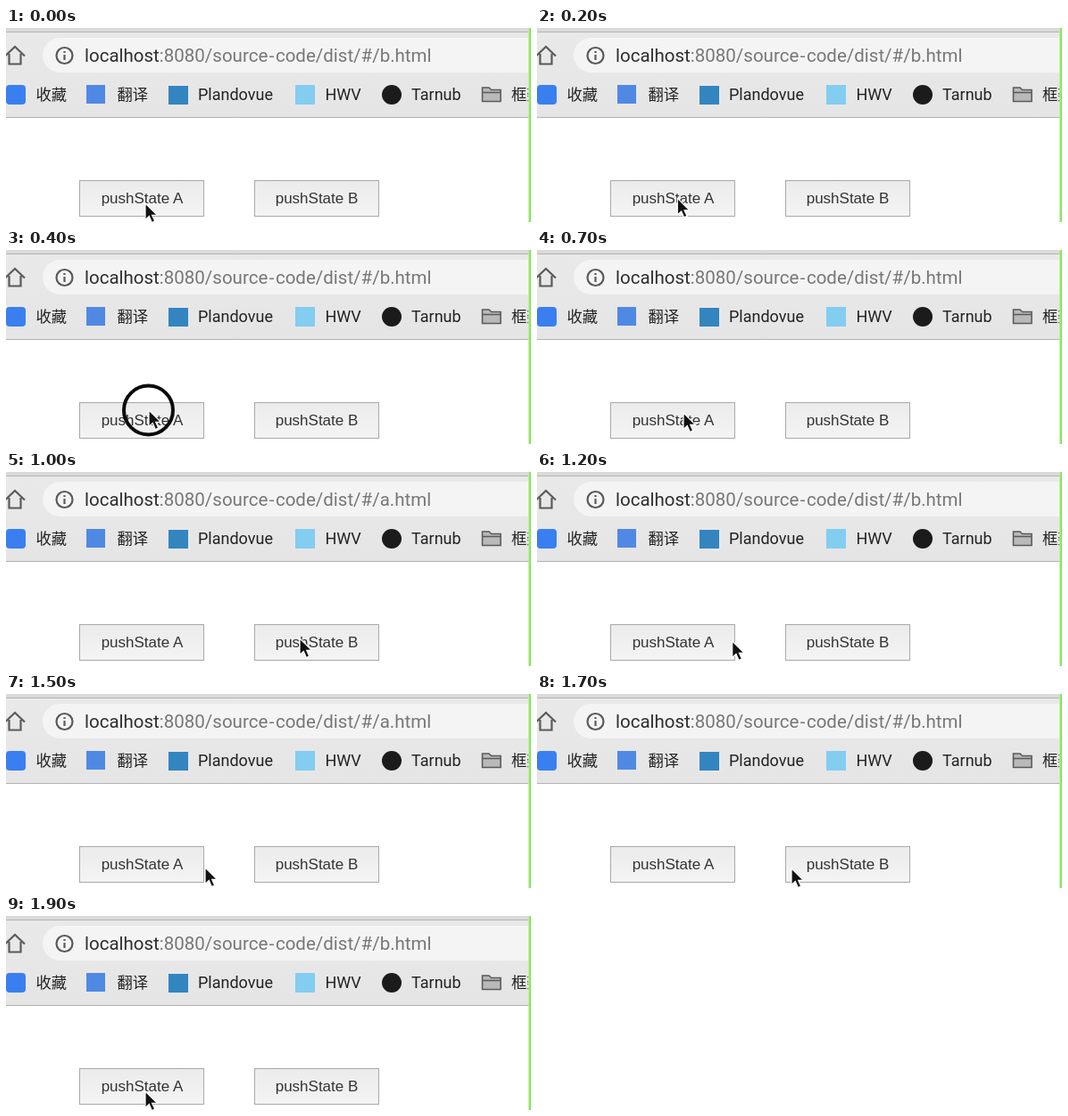
An HTML page that plays this animation: 588x218 px, repeating every 2000 ms.

```html
<!DOCTYPE html>
<html lang="zh">
<head>
<meta charset="utf-8">
<title>pushState</title>
<style>
  html, body { margin: 0; width: 100%; height: 100%; overflow: hidden; background: #fff; }
  svg { display: block; width: 588px; height: 218px; }
  .url { font: 20.5px Roboto, sans-serif; fill: #777; }
  .host { fill: #2e2e2e; }
  .mark { font: 18px Roboto, "Noto Sans CJK SC", "Noto Sans CJK", sans-serif; fill: #222; }
  .cjk { font-size: 17.3px; }
  .btn { font: 17px "Liberation Sans", Arial, sans-serif; fill: #333; text-anchor: middle; }
  .line { fill: none; stroke: #5a5a5a; stroke-width: 2.2; }
</style>
</head>
<body>
<svg viewBox="0 0 588 218">
  <defs>
    <linearGradient id="bar" x2="0" y2="1">
      <stop stop-color="#e9e9e9"/><stop offset="1" stop-color="#e5e5e5"/>
    </linearGradient>
    <linearGradient id="face" x2="0" y2="1">
      <stop stop-color="#ebebeb"/><stop offset="1" stop-color="#f4f4f4"/>
    </linearGradient>
    <g id="button">
      <rect x=".5" y=".5" width="139" height="40" fill="url(#face)" stroke="#a9a9a9"/>
    </g>
  </defs>

  <rect width="588" height="218" fill="#fff"/>
  <rect width="588" height="4" fill="#dadada"/>
  <rect y="4" width="588" height="97" fill="url(#bar)"/>
  <path d="M0 4.5H588M0 100.5H588" stroke="#b3b3b3"/>

  <path class="line" d="M-1 31.5L10 21L21 31.5M3.5 29V40.5H16.5V29"/>
  <rect x="41" y="11" width="580" height="39" rx="19.5" fill="#f4f4f4"/>
  <circle class="line" cx="65.5" cy="31" r="9"/>
  <path class="line" d="M65.5 30V36M65.5 26V28"/>
  <text class="url" x="88" y="38"><tspan class="host">localhost</tspan>:8080/source<tspan dx="1.5">-</tspan><tspan dx="1.5">code</tspan>/dist/#/<tspan id="page">b</tspan>.html</text>

  <rect x="0" y="64" width="22" height="22" rx="4" fill="#397ff0"/>
  <text class="mark cjk" x="33.5" y="81">收藏</text>
  <rect x="90" y="64" width="21" height="21" fill="#5089e4"/>
  <text class="mark cjk" x="124.5" y="81">翻译</text>
  <rect x="182" y="65" width="22" height="21" fill="#3385c0"/>
  <text class="mark" x="215" y="81">Plandovue</text>
  <rect x="324" y="64" width="22" height="22" fill="#83cdf0"/>
  <text class="mark" x="357.5" y="81">HWV</text>
  <circle cx="432" cy="75" r="11" fill="#1b1b1b"/>
  <text class="mark" x="454" y="81">Tarnub</text>
  <path d="M533.5 82.5V67H541L543.5 69.5H554V82.5ZM533.5 72.5H554" fill="#b9b9b9" stroke="#5a5a5a" stroke-width="1.6"/>
  <text class="mark cjk" x="566" y="81">框架</text>

  <use href="#button" x="82" y="171"/>
  <use href="#button" x="278" y="171"/>
  <text class="btn" x="152.5" y="197">pushState A</text>
  <text class="btn" x="348" y="197">pushState B</text>

  <rect x="585" width="3" height="218" fill="#b5ef9a"/>
  <rect x="586" width="2" height="218" fill="#8fe466"/>

  <circle id="ring" r="27.5" fill="none" stroke="#0a0a0a" stroke-width="4"/>
  <path id="cursor" d="M0 0V18.5L4.3 14.6L7.3 21.5L10.7 20L7.7 13.4H13.4Z" fill="#111" stroke="#fff" stroke-width="1.2"/>
</svg>
<script>
  const LOOP = 2000, STEP = 100;
  const $ = id => document.getElementById(id);

  // Pointer path: time, x, y
  const path = [
    [0, 156, 197], [100, 156, 197], [400, 160, 180], [700, 164, 183],
    [800, 185, 185], [1000, 329, 187], [1100, 300, 188], [1200, 218.7, 190],
    [1300, 167, 190], [1400, 170, 192], [1500, 223, 195], [1600, 305, 196],
    [1700, 285, 196], [1800, 188, 196], [1900, 156, 197]
  ];
  const pageA = [[800, 1100], [1400, 1700]];
  const presses = [[300, 500], [1300, 1400]];

  const within = (spans, t) => spans.some(([from, to]) => t >= from && t < to);

  function pointer(t) {
    const i = path.findIndex(p => p[0] >= t);
    const b = path[i], a = path[Math.max(0, i - 1)];
    const k = b === a ? 0 : (t - a[0]) / (b[0] - a[0]);
    return [a[1] + (b[1] - a[1]) * k, a[2] + (b[2] - a[2]) * k];
  }

  function draw(ms) {
    const t = Math.floor(ms % LOOP / STEP) * STEP;
    const [x, y] = pointer(t);
    $("cursor").setAttribute("transform", `translate(${x} ${y})`);
    $("ring").setAttribute("cx", x - 0.5);
    $("ring").setAttribute("cy", y);
    $("ring").setAttribute("visibility", within(presses, t) ? "visible" : "hidden");
    $("page").textContent = within(pageA, t) ? "a" : "b";
  }

  const start = performance.now();
  function tick() {
    draw(performance.now() - start);
    requestAnimationFrame(tick);
  }
  tick();
</script>
</body>
</html>
```
